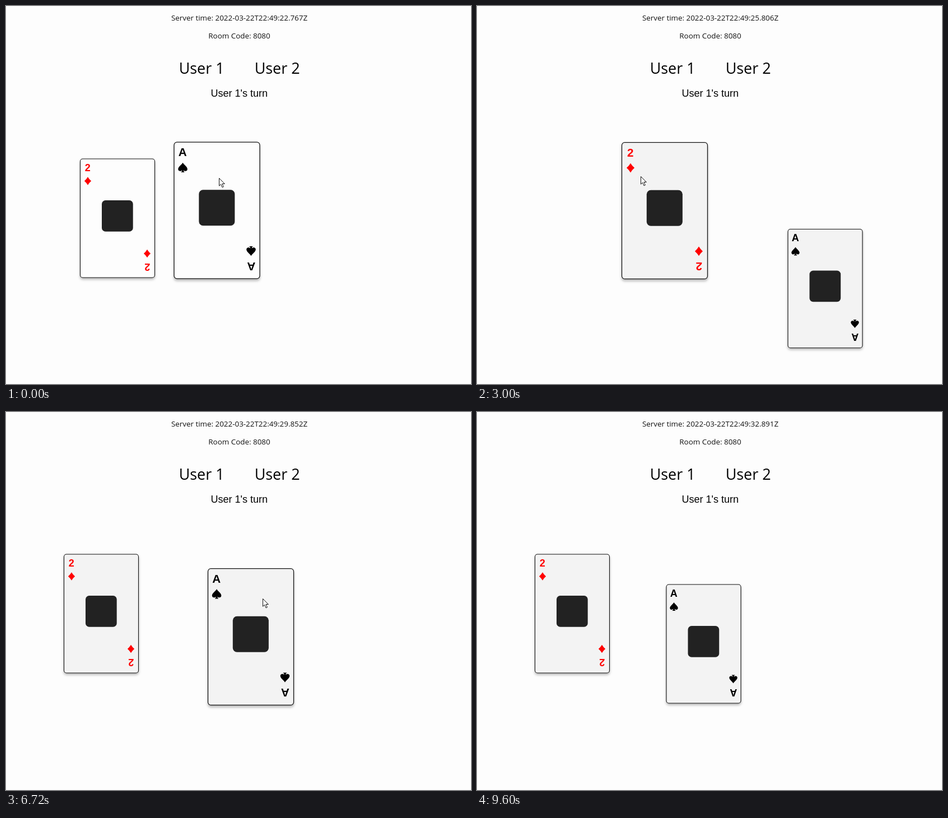
Animation of 830x675 px, one loop 9850 ms. Source, as an HTML page:

```html
<!DOCTYPE html>
<html lang="en">
<head>
<meta charset="utf-8">
<title>Card table</title>
<style>
  html, body { margin: 0; width: 100%; height: 100%; overflow: hidden; background: #fdfdfd; }
  svg { display: block; width: 830px; height: 675px; }
  .ui { font-family: "Open Sans", "Noto Sans", sans-serif; font-size: 13.4px; fill: #111; }
  .user { font-size: 26.9px; fill: #000; }
  .turn { font: 18px "Liberation Sans", Arial, sans-serif; fill: #000; }
  .rank { font: bold 18px "Liberation Sans", Arial, sans-serif; }
  .mid { text-anchor: middle; }
  .sheet { stroke: #111; stroke-width: 1.1; filter: drop-shadow(0 3px 2px rgba(0, 0, 0, .27)); }
</style>
</head>
<body>
<svg viewBox="0 0 830 675">
  <defs>
    <path id="diamond" d="M0-7.3Q2.6-3 6.1 0Q2.6 3 0 7.3Q-2.6 3-6.1 0Q-2.6-3 0-7.3Z"/>
    <path id="spade" d="M0-7.6C2-4 7.2-1.3 7.2 2.4C7.2 6 2.7 6.4 1 3.8Q1.2 6.4 3 7.4H-3Q-1.2 6.4-1 3.8C-2.7 6.4-7.2 6-7.2 2.4C-7.2-1.3-2-4 0-7.6Z"/>
  </defs>
  <text class="ui mid" id="clock" x="416.5" y="25.5"></text>
  <text class="ui mid" x="416.5" y="58">Room Code: 8080</text>
  <text class="ui user" x="308.7" y="121">User 1</text>
  <text class="ui user" x="443.7" y="121">User 2</text>
  <text class="turn mid" x="416.2" y="161.5">User 1's turn</text>
  <g id="ace"></g>
  <g id="two"></g>
  <path id="cursor" d="M.5.5V14.2L3.6 11.3L6 16.8L8.3 15.8L5.9 10.5H10.3Z" fill="#fff" stroke="#111"/>
</svg>
<script>
const LOOP = 9850, STEP = 60;
const LAG = 60;        // a held card trails the pointer
const HOVER = 120;     // time to lift or settle
const RISE = 15, GROW = .15;
const $ = id => document.getElementById(id);

// Turning points of the pointer: time, x, y.
const path = [
  [90, 380, 307], [1000, 664, 306], [1380, 625, 431.5], [1480, 625, 431.5],
  [1900, 208, 298], [2300, 208, 298], [2760, 507, 324], [2940, 344, 299.5],
  [3000, 292, 304], [3200, 177, 290], [3600, 270, 393], [3900, 179, 279],
  [3980, 179, 279], [4230, 635, 587], [4600, 642.5, 421], [4920, 642.5, 421],
  [5100, 512.5, 362], [5160, 476, 348], [5340, 398, 336], [5760, 680, 350],
  [6200, 383, 290], [6420, 491, 422], [6630, 458, 333], [6800, 458, 333],
  [7440, 439, 409], [8150, 439, 409], [8340, 640, 428], [8560, 406.5, 406.5],
  [8780, 725, 512], [9060, 713, 517], [9280, 406.5, 406.5], [9360, 406.5, 406.5],
  [9480, 420, 700]
];

// Each grab: start, end, pointer offset from the card's centre.
const cards = [
  { id: 'ace', rank: 'A', suit: 'spade', color: '#000', tinted: 90,
    home: [376.5, 365],
    grabs: [[0, 1440, 3.5, -58], [4920, 6720, 21, -68.5], [8150, 9360, 2, 7.5]] },
  { id: 'two', rank: '2', suit: 'diamond', color: '#f00', tinted: 1860,
    home: [199, 364],
    grabs: [[2300, 3960, 9, -66]] }
];

const clamp = v => Math.min(1, Math.max(0, v));
const ease = v => { v = clamp(v); return v * v * (3 - 2 * v); };
const slope = (i, n) => (path[i + 1][n] - path[i][n]) / (path[i + 1][0] - path[i][0]);

// Smooth tangent that never overshoots a turning point.
function tangent(i, n) {
  if (i === 0 || i === path.length - 1) return 0;
  const a = slope(i - 1, n), b = slope(i, n);
  return a * b > 0 ? 2 * a * b / (a + b) : 0;
}

function pointer(t) {
  const i = path.findIndex(k => k[0] > t) - 1;
  if (i === -1) return path[0].slice(1);
  if (i < 0) return path[path.length - 1].slice(1);
  const span = path[i + 1][0] - path[i][0], p = (t - path[i][0]) / span, q = 1 - p;
  return [1, 2].map(n =>
    q * q * (1 + 2 * p) * path[i][n] + p * p * (3 - 2 * p) * path[i + 1][n] +
    span * p * q * (q * tangent(i, n) - p * tangent(i + 1, n)));
}

function center(card, t) {
  const grab = card.grabs.filter(g => g[0] <= t).pop();
  if (!grab) return card.home;
  const [, end, dx, dy] = grab;
  const [x, y] = pointer(Math.min(t, end) - LAG);
  return [x - dx, y - dy];
}

function hovered(card, t) {
  if (card.grabs.some(g => t >= g[0] && t < g[1])) return 1;
  const [px, py] = pointer(t), [x, y] = center(card, t);
  return Math.abs(px - x) < 77 && Math.abs(py - y) < 122 ? 1 : 0;
}

// Share of the last moments spent under the pointer.
function lift(card, t) {
  const n = 10;
  let sum = 0;
  for (let i = 0; i < n; i++) sum += hovered(card, t - i * HOVER / n);
  return ease(sum / n);
}

const sheet = '<rect class="sheet" x="-66.5" y="-106" width="133" height="212" rx="4.5"/>';

function front({ rank, suit, color }) {
  const mark = `<text class="rank mid" x="-53.3" y="-84.3">${rank}</text>
    <use href="#${suit}" x="-53" y="-66.5"/>`;
  return `<g class="front">${sheet}
    <g fill="${color}">${mark}<g transform="translate(0 -3.5) rotate(180)">${mark}</g></g>
    <rect x="-28" y="-32" width="55.7" height="55.7" rx="6.5" fill="#222"/></g>`;
}

function back() {
  let shapes = '';
  for (const x of [-31.8, 30.2])
    for (const y of [-65, 1, 67])
      shapes += `<path d="M${x} ${y - 34}l30 34l-30 34l-30-34Z"/>`;
  return `<g class="back">${sheet}
    <rect x="-63" y="-102" width="126" height="204" rx="8" fill="#7f0000" stroke="#111" stroke-width="1.7"/>
    <g fill="#ff4552" stroke="#111">${shapes}</g></g>`;
}

for (const card of cards) $(card.id).innerHTML = front(card) + back();

function place(card, t) {
  const el = $(card.id), [x, y] = center(card, t);
  const flip = card.id === 'ace' ? ease((t - 7440) / 160) - ease((t - 7920) / 160) : 0;
  const up = lift(card, t) * (1 - flip / 4);
  const s = 1 + GROW * up, turn = Math.cos(Math.PI * flip);
  el.setAttribute('transform',
    `translate(${x} ${y + RISE * (1 - up)}) scale(${s * Math.max(Math.abs(turn), .01)} ${s})`);
  el.setAttribute('fill', t < card.tinted ? '#fdfdfd' : '#f3f3f3');
  el.querySelector('.front').style.display = turn >= 0 ? '' : 'none';
  el.querySelector('.back').style.display = turn < 0 ? '' : 'none';
}

function draw(now) {
  const t = Math.floor(now % LOOP / STEP) * STEP;
  const n = Math.floor((t + 925) / 1013);
  const ms = 767 + 12 * n + n % 6;
  $('clock').textContent = `Server time: 2022-03-22T22:49:${22 + n}.${ms}Z`;
  cards.forEach(card => place(card, t));
  $('cursor').setAttribute('transform', `translate(${pointer(t)})`);
}

const start = performance.now();
function loop() {
  draw(performance.now() - start);
  requestAnimationFrame(loop);
}
loop();
</script>
</body>
</html>
```
